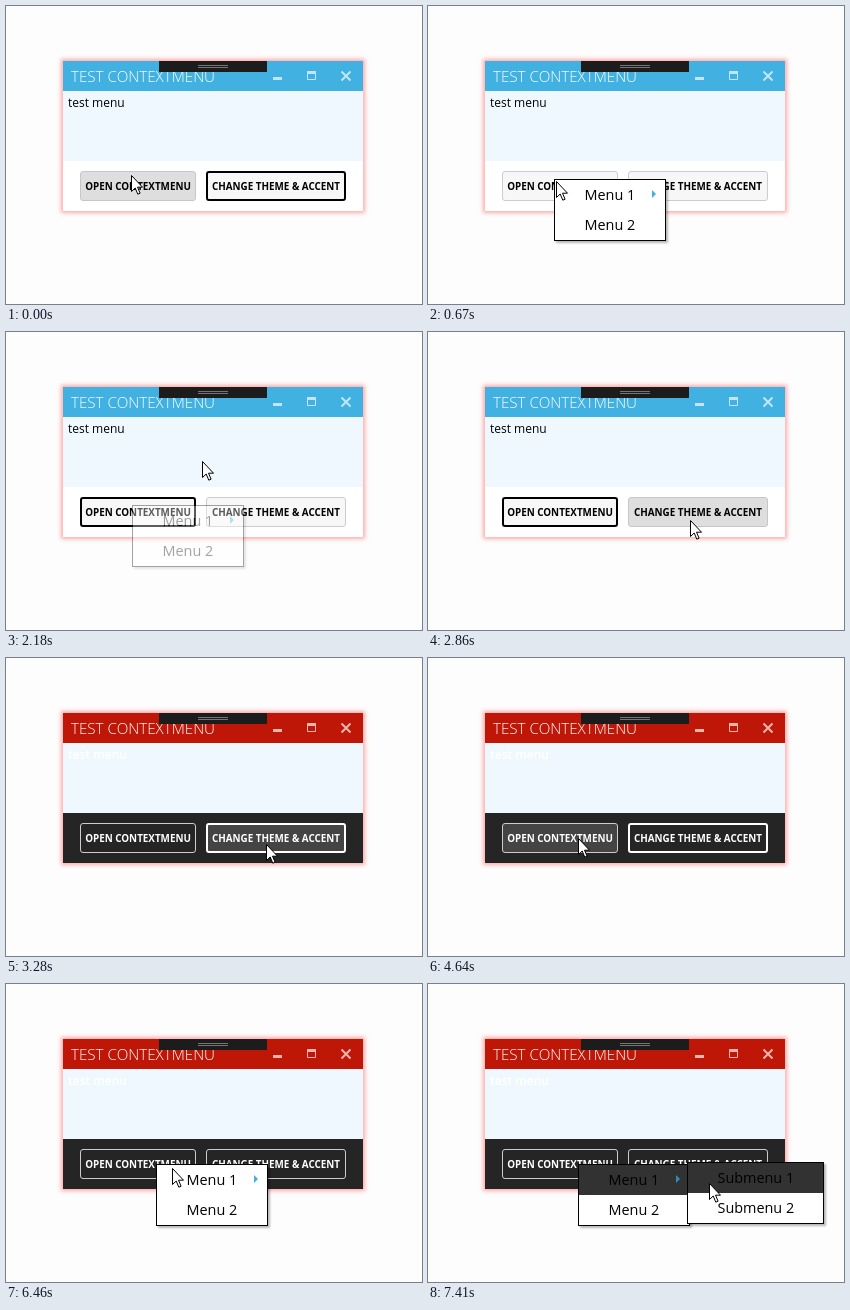
Write an HTML page that moves like this. It is 416 px wide and 298 px high and loops after 8 s.

```html
<!DOCTYPE html>
<html lang="en">
<head>
<meta charset="utf-8">
<title>Context menu test</title>
<style>
html, body { margin: 0; width: 100%; height: 100%; overflow: hidden; background: #fff; }
#stage {
  position: relative; width: 416px; height: 298px; overflow: hidden; background: #fdfdfd;
  font: 12px "Open Sans", "Noto Sans", sans-serif; white-space: nowrap; color: #000;
}
#stage * { position: absolute; box-sizing: border-box; }
.anim { animation: 8s step-end infinite; }

#window { left: 57px; top: 55px; width: 300px; height: 150px; box-shadow: 0 0 4px 2px #ffaaaa; animation-name: body; }
#titlebar { width: 300px; height: 30px; animation-name: accent; }
#caption { left: 8px; font-size: 15.2px; font-weight: 300; line-height: 30px; color: #fff; }
#toolbar { left: 96px; width: 108px; height: 11px; background: #1c1c1c; }
#grip { left: 39px; top: 4px; width: 30px; height: 3px; border: solid #747474; border-width: 1px 0; }
#controls { left: 0; top: 0; fill: none; stroke: #fff; opacity: .68; }
#content { top: 30px; width: 300px; height: 70px; background: #f0f8ff; }
#label { left: 5px; top: 2px; line-height: 20px; animation-name: label; }

.button {
  top: 110px; height: 30px; border: 1px solid; border-radius: 3px;
  display: flex; align-items: center; justify-content: center;
  font-size: 9.85px; font-weight: 700;
}
#open { left: 17px; width: 116px; animation-name: open; }
#change { left: 143px; width: 140px; animation-name: change; }

.menu { height: 62px; background: #fff; border: 1px solid #000; box-shadow: 2px 2px 2px rgba(0,0,0,.28); }
.item { left: 0; right: 0; height: 30px; padding-left: 29.5px; font-size: 14.4px; line-height: 30px; }
.item + .item { top: 30px; }
#menu { width: 112px; animation-name: menu; }
#submenu { left: 108px; top: -3px; width: 137px; animation-name: submenu; }
#first { animation-name: first; }
#subfirst { animation-name: subfirst; }
#arrow { left: 97px; top: 10px; width: 4px; height: 8px; clip-path: polygon(0 0, 100% 50%, 0 100%); animation-name: arrow; }
#cursor { left: 0; top: 0; overflow: visible; animation-name: cursor; }

/* Theme switch */
@keyframes body { 0% { background: #fff; } 41% { background: #252525; } }
@keyframes accent { 0% { background: #41b1e1; } 41% { background: #be1707; } }
@keyframes label { 0% { color: #000; font-weight: 400; } 41% { color: #fff; font-weight: 600; } }

/* Hover and focus */
@keyframes open {
  0%      { background: #dedede; border: 1px solid #c6c6c6; color: #000; }
  3.375%  { background: #dedede; border: 2px solid #000; color: #000; }
  4.875%  { background: #f7f7f7; border: 1px solid #ccc; color: #000; }
  27.25%  { background: #f7f7f7; border: 2px solid #000; color: #000; }
  37.625% { background: #f7f7f7; border: 1px solid #ccc; color: #000; }
  41%     { background: #252525; border: 1px solid #ccc; color: #fff; }
  54.875% { background: #444; border: 1px solid #ccc; color: #fff; }
  72.75%  { background: #444; border: 2px solid #fff; color: #fff; }
  74.25%  { background: #252525; border: 1px solid #ccc; color: #fff; }
}
@keyframes change {
  0%      { background: #f7f7f7; border: 2px solid #000; color: #000; }
  3.375%  { background: #f7f7f7; border: 1px solid #ccc; color: #000; }
  30.625% { background: #dedede; border: 1px solid #c6c6c6; color: #000; }
  37.625% { background: #dedede; border: 2px solid #000; color: #000; }
  41%     { background: #444; border: 2px solid #fff; color: #fff; }
  54.875% { background: #252525; border: 2px solid #fff; color: #fff; }
  72.75%  { background: #252525; border: 1px solid #ccc; color: #fff; }
}

/* Popups */
@keyframes menu {
  0%     { opacity: 0; transform: translate(126px, 173px); }
  4.875% { opacity: .35; transform: translate(126px, 173px); }
  6.375% { opacity: .8; transform: translate(126px, 173px); }
  8.375% { opacity: 1; transform: translate(126px, 173px); }
  27.25% { opacity: .36; transform: translate(126px, 173px); }
  28.75% { opacity: 0; transform: translate(150px, 180px); }
  74.25% { opacity: .35; transform: translate(150px, 180px); }
  75.75% { opacity: .8; transform: translate(150px, 180px); }
  77.25% { opacity: 1; transform: translate(150px, 180px); }
}
@keyframes submenu {
  0%      { opacity: 0; }
  15.125% { opacity: .5; }
  16.625% { opacity: 1; }
  27.25%  { opacity: 0; }
  85.75%  { opacity: .6; }
  87.625% { opacity: 1; }
}
@keyframes first {
  0% { background: #fff; }
  10.125% { background: #dcdcdc; }
  27.25% { background: #fff; }
  82.625% { background: #323232; }
}
@keyframes subfirst { 0% { background: #fff; } 92.625% { background: #323232; } }
@keyframes arrow { 0% { background: #41b1e1; } 82.625% { background: #2b8fbd; } }

@keyframes cursor {
  0%      { transform: translate(125px, 169px); }
  1.625%  { transform: translate(126px, 173px); }
  8.375%  { transform: translate(128px, 175px); }
  10.125% { transform: translate(160px, 188px); }
  11.625% { transform: translate(178px, 192px); }
  15.125% { transform: translate(180px, 193px); }
  22%     { transform: translate(189px, 160px); }
  23.5%   { transform: translate(196px, 129px); }
  28.75%  { transform: translate(201px, 142px); }
  30.625% { transform: translate(267px, 190px); }
  35.75%  { transform: translate(262px, 188px); }
  37.625% { transform: translate(260px, 186px); }
  49.625% { transform: translate(256px, 186px); }
  51.125% { transform: translate(252px, 186px); }
  53%     { transform: translate(188px, 196px); }
  54.875% { transform: translate(152px, 181px); }
  58%     { transform: translate(150px, 180px); }
  72.75%  { transform: translate(151px, 181px); }
  80.75%  { transform: translate(166px, 184px); }
  82.625% { transform: translate(182px, 190px); }
  91.125% { transform: translate(232px, 195px); }
  92.625% { transform: translate(281px, 199px); }
}
</style>
</head>
<body>
<div id="stage">
  <div id="window" class="anim">
    <div id="titlebar" class="anim">
      <div id="caption">TEST CONTEXTMENU</div>
      <svg id="controls" width="300" height="30">
        <path d="M210 17.5h9" stroke-width="3"/>
        <path d="M244.5 11v7.5h8V11"/>
        <path d="M244 11.5h9" stroke-width="3"/>
        <path d="M278.5 10.5l9 9m0-9l-9 9" stroke-width="2"/>
      </svg>
      <div id="toolbar"><div id="grip"></div></div>
    </div>
    <div id="content"><div id="label" class="anim">test menu</div></div>
    <div id="open" class="button anim">OPEN CONTEXTMENU</div>
    <div id="change" class="button anim">CHANGE THEME &amp; ACCENT</div>
  </div>
  <div id="menu" class="menu anim">
    <div id="first" class="item anim">Menu 1<div id="arrow" class="anim"></div></div>
    <div class="item">Menu 2</div>
    <div id="submenu" class="menu anim">
      <div id="subfirst" class="item anim">Submenu 1</div>
      <div class="item">Submenu 2</div>
    </div>
  </div>
  <svg id="cursor" class="anim" width="13" height="21">
    <path d="M.5 .5v16l3.7-3.5 2.6 6.2 2.3-1-2.6-6h5z" fill="#fff" stroke="#000"/>
  </svg>
</div>
</body>
</html>
```
